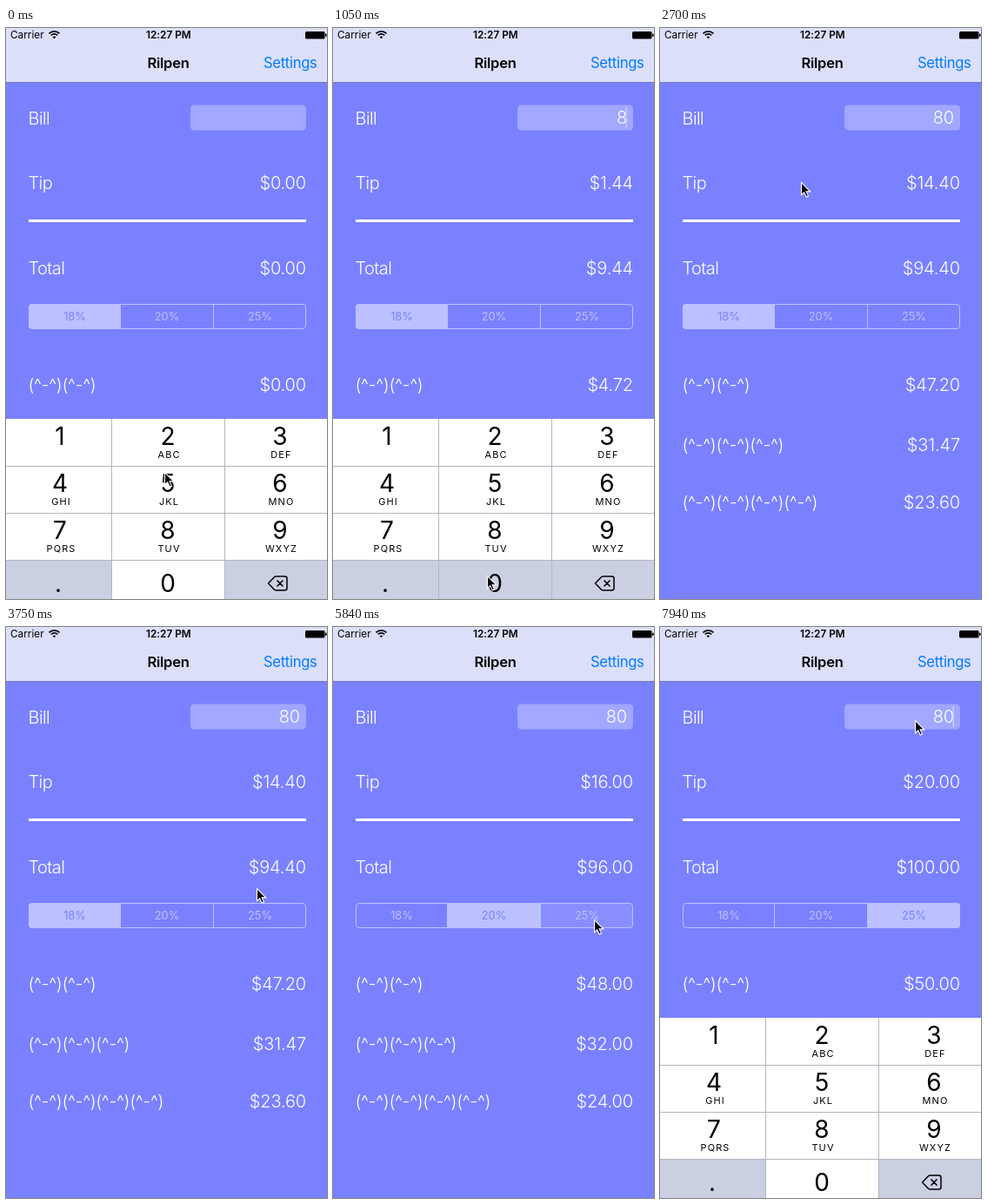
These frames come from a looping animation (369x656 px, 8000 ms). An HTML page:

```html
<!DOCTYPE html>
<html lang="en">
<head>
<meta charset="utf-8">
<title>Tip calculator</title>
<style>
  html, body { margin: 0; width: 100%; height: 100%; overflow: hidden; background: #7a81ff; }
  svg { display: block; width: 100%; height: 100%; }
  text { font-family: Inter, Roboto, sans-serif; font-variant-ligatures: none; font-feature-settings: "calt" 0; }
  .status { font-size: 11.8px; }
  .bold { font-weight: 600; }
  .nav { font-size: 16.6px; letter-spacing: -.3px; }
  .label, .value { font-size: 20px; font-weight: 300; fill: #fff; }
  .label { letter-spacing: -.6px; }
  .faces { letter-spacing: -.4px; }
  .value { text-anchor: end; letter-spacing: -.15px; }
  .segment { font-size: 12.8px; text-anchor: middle; }
  .digit { font-size: 28px; text-anchor: middle; }
  .letters { font-size: 11px; letter-spacing: 1.1px; text-anchor: middle; }
</style>
</head>
<body>
<svg id="stage" viewBox="0 0 369 656"></svg>
<script>
const LOOP = 8000, STEP = 150;
const BACKGROUND = '#7a81ff', TINT = '#bdc0ff', KEY_GRAY = '#cbcfe2';
const RATES = [18, 20, 25];
const stage = document.getElementById('stage');

// Pointer tip: time, x, y
const POINTER = [
  [0, 182, 510], [450, 183, 574], [750, 183, 576], [1050, 177, 629], [1200, 177, 629],
  [1500, 174, 510], [1800, 168, 300], [2100, 164, 176], [2400, 162, 177], [3000, 162, 177],
  [3150, 170, 168], [3450, 240, 208], [3600, 282, 260], [3750, 288, 300], [4050, 206, 328],
  [4350, 202, 334], [4790, 202, 334], [5390, 258, 329], [5840, 300, 336], [6440, 300, 336],
  [6740, 280, 282], [6890, 268, 215], [7040, 278, 140], [7190, 293, 107], [LOOP, 293, 107]
];

const within = (t, from, to) => t >= from && t < to;
const rect = (x, y, w, h, fill, extra = '') =>
  `<rect x="${x}" y="${y}" width="${w}" height="${h}" fill="${fill}" ${extra}/>`;
const text = (x, y, cls, content, fill) =>
  `<text x="${x}" y="${y}" class="${cls}"${fill ? ` fill="${fill}"` : ''}>${content}</text>`;
const money = amount => '$' + amount.toFixed(2);

function stateAt(t) {
  const i = POINTER.findIndex((p, n) => n && t < p[0]);
  const [t0, x0, y0] = POINTER[i - 1], [t1, x1, y1] = POINTER[i];
  const k = (t - t0) / (t1 - t0);
  return {
    x: x0 + (x1 - x0) * k,
    y: y0 + (y1 - y0) * k,
    bill: t < 750 ? '' : t < 1200 ? '8' : '80',
    selected: t < 4350 ? 0 : t < 5990 ? 1 : 2,
    selectedOpacity: within(t, 4350, 4940) ? .86 : 1,
    touched: within(t, 4200, 4350) ? 1 : within(t, 5840, 5990) ? 2 : -1,
    pressed: within(t, 450, 750) ? '8' : within(t, 1050, 1200) ? '0' : '',
    caret: within(t, 300, 1800) || within(t, 2250, 2700) || t >= 7790,
    keyboardDrop: within(t, 2700, 7790) ? 207 : within(t, 7790, 7940) ? 90 : 0
  };
}

function header() {
  return rect(0, 0, 369, 62, '#dcdffa') + rect(0, 62, 369, 1, '#7479bd')
    + text(5, 12.3, 'status', 'Carrier')
    + '<path d="M49.5 6.3a8.5 8.5 0 0 1 12 0M51.7 8.5a5.4 5.4 0 0 1 7.6 0" fill="none" stroke="#000" stroke-width="1.7"/>'
    + '<path d="M53.6 10.4a2.7 2.7 0 0 1 3.8 0l-1.9 1.9z"/>'
    + text(161, 12.3, 'status bold', '12:27 PM')
    + rect(344, 4, 22.5, 8.5, '#000', 'rx="1.5"') + rect(367, 6.5, 1.5, 3.5, '#000', 'rx=".7"')
    + `<g text-anchor="middle">${text(186.5, 46, 'nav bold', 'Rilpen')}</g>`
    + `<g text-anchor="end">${text(357.5, 46, 'nav', 'Settings', '#007aff')}</g>`;
}

function segments({ selected, selectedOpacity, touched }) {
  const edges = [26, 131, 238, 345];
  const cells = RATES.map((rate, i) => {
    const x = edges[i], width = edges[i + 1] - x + (i < 2 ? 1 : 0);
    const fill = i === selected ? TINT : i === touched ? '#888eff' : 'none';
    return rect(x, 317, width, 29, fill, i === selected ? `opacity="${selectedOpacity}"` : '')
      + (i ? rect(x, 317, 1, 29, TINT) : '')
      + text([79, 185, 292][i], 336, 'segment', rate + '%', i === selected ? BACKGROUND : TINT);
  }).join('');
  return `<clipPath id="pill">${rect(26, 317, 319, 29, '#000', 'rx="4"')}</clipPath>`
    + `<g clip-path="url(#pill)">${cells}</g>`
    + rect(26.5, 317.5, 318, 28, 'none', `rx="3.5" stroke="${TINT}"`);
}

function calculator(state) {
  const bill = Number(state.bill), tip = bill * RATES[state.selected] / 100, total = bill + tip;
  const row = (y, label, amount) => text(25.5, y, 'label', label) + text(345, y, 'value', money(amount));
  const split = (people, y) =>
    text(25.5, y, 'label faces', '(^-^)'.repeat(people)) + text(345, y, 'value', money(total / people));
  return text(25.5, 111, 'label', 'Bill')
    + rect(212, 88.5, 133, 29, '#a2a7ff', 'rx="4.5"')
    + text(338, 110.3, 'value', state.bill)
    + (state.caret ? rect(336.5, 91, 1.5, 24, '#c9ccff') : '')
    + row(185, 'Tip', tip) + rect(26, 220, 319, 3, '#fff') + row(283, 'Total', total)
    + segments(state)
    + split(2, 417) + split(3, 486) + split(4, 552);
}

function keyboard({ pressed, keyboardDrop }) {
  const letters = ['', 'ABC', 'DEF', 'GHI', 'JKL', 'MNO', 'PQRS', 'TUV', 'WXYZ'];
  const columns = [[0, 121, 62], [122, 129, 186], [252, 117, 315]];
  let keys = rect(0, 449, 369, 207, '#b3b5c1');
  [...'123456789.0<'].forEach((key, i) => {
    const [x, width, center] = columns[i % 3], line = Math.floor(i / 3);
    const top = 449 + line * 54 + (line ? 1 : 0);
    const gray = key === pressed || '.<'.includes(key);
    const baseline = line === 3 ? 648 : 479 + line * 54;
    keys += rect(x, top, width, line ? 53 : 54, gray ? KEY_GRAY : '#fff');
    if (key !== '<') keys += text(key === '.' ? 60 : center, baseline, 'digit', key);
    if (letters[i]) keys += text(center + 1.5, baseline + 15, 'letters', letters[i]);
  });
  keys += '<path d="M301.5 638l7-7.2q.8-.8 2-.8h10q2.5 0 2.5 2.5v11q0 2.5-2.5 2.5h-10q-1.2 0-2-.8zM311.5 634.5l7 7m0-7l-7 7" fill="none" stroke="#000" stroke-width="1.5" stroke-linejoin="round"/>';
  return `<g transform="translate(0 ${keyboardDrop})">${keys}</g>`;
}

const pointer = ({ x, y }) =>
  `<path transform="translate(${x + .5} ${y + .5})" d="M0 0V14.2L3.2 11.3L5.7 16.6L8 15.6L5.6 10.4H10.2Z" stroke="#fff" stroke-width="1.1"/>`;

let shown = -1;
function draw(now) {
  const t = now % LOOP;
  // Time ticks every 150 ms, with one short tick ending at 4490.
  const origin = t < 4490 ? 0 : 4490;
  const tick = origin + Math.floor((t - origin) / STEP) * STEP;
  if (tick !== shown) {
    shown = tick;
    const state = stateAt(tick);
    stage.innerHTML = calculator(state) + keyboard(state) + header() + pointer(state);
  }
}

const start = performance.now();
function loop(now) {
  draw(Math.max(0, now - start));
  requestAnimationFrame(loop);
}
requestAnimationFrame(loop);
</script>
</body>
</html>
```
